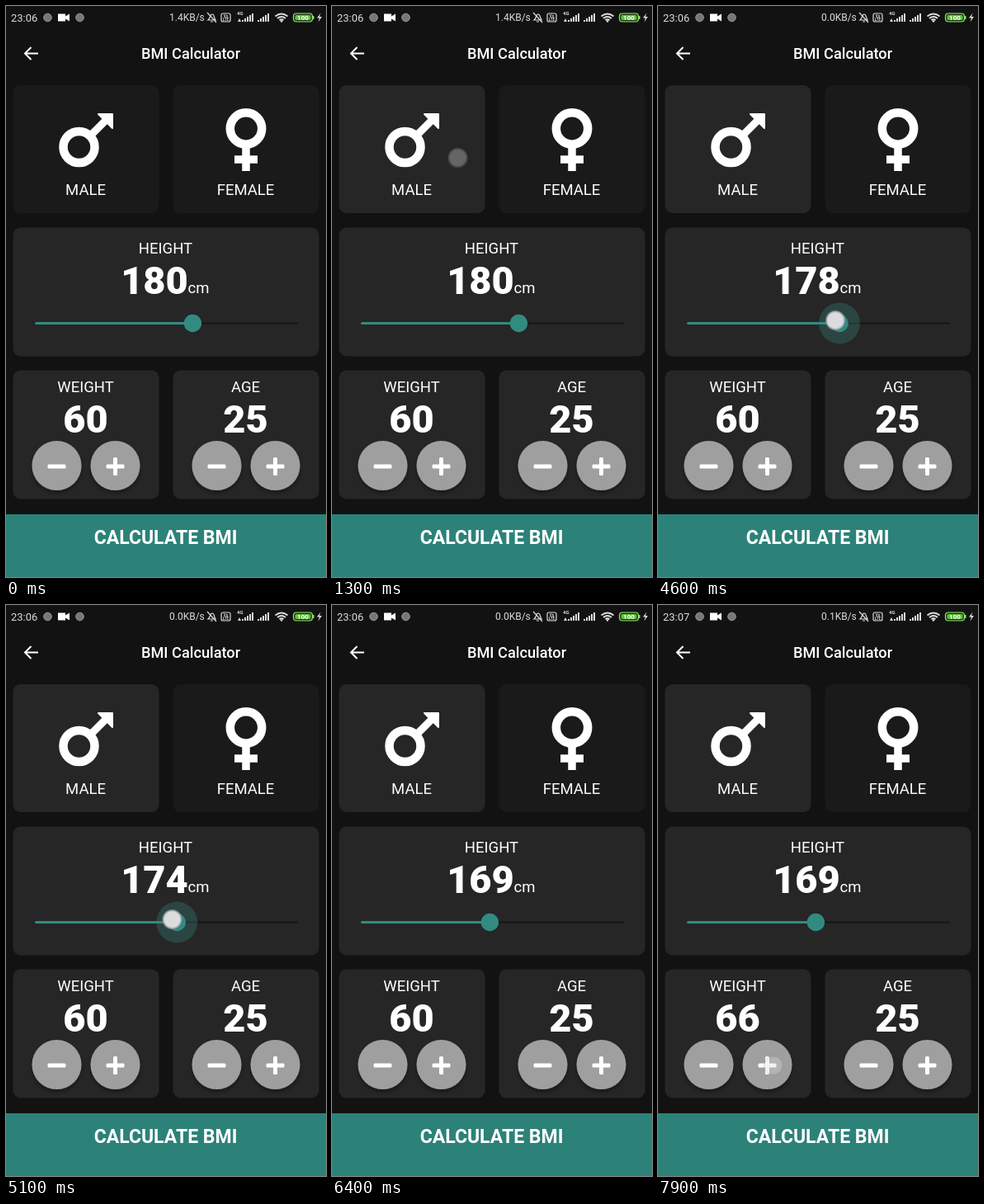
These frames come from a looping animation (388 px wide and 692 px high, 8000 ms). An HTML page:

```html
<!DOCTYPE html>
<html lang="en">
<head>
<meta charset="utf-8">
<title>BMI Calculator</title>
<style>
  html, body { margin: 0; width: 100%; height: 100%; overflow: hidden; background: #121212; }
  svg { display: block; width: 388px; height: 692px; font-family: Roboto, sans-serif; fill: #fff; }
  .card { fill: #262626; }
  .idle { fill: #1a1a1a; }
  .label { font-size: 18.5px; text-anchor: middle; }
  .num { font-size: 47px; font-weight: 900; text-anchor: middle; }
  .status { fill: #dcdcdc; }
  .line { fill: none; stroke: #dcdcdc; stroke-width: 1.2; }
  .icon { fill: none; stroke: #fff; }
</style>
</head>
<body>
<svg viewBox="0 0 388 692">
  <defs>
    <filter id="shadow" x="-20%" y="-20%" width="140%" height="150%">
      <feDropShadow dx="0" dy="3" stdDeviation="2.5" flood-color="#000" flood-opacity=".4"/>
    </filter>
    <radialGradient id="glow">
      <stop offset=".7" stop-color="#dcdcde"/>
      <stop offset=".85" stop-color="#b4b4ba" stop-opacity=".8"/>
      <stop offset="1" stop-color="#55506a" stop-opacity="0"/>
    </radialGradient>
    <g id="disc">
      <circle r="30" fill="#9f9f9f" filter="url(#shadow)"/>
      <rect x="-11" y="-1.6" width="22" height="5" rx="1.5"/>
    </g>
    <g id="plus">
      <use href="#disc"/>
      <rect x="-2.5" y="-10" width="5" height="22" rx="1.5"/>
    </g>
    <g id="bars">
      <path d="M0 10v-2h2v2zM3 10v-4h2v4zM6 10v-6h2v6zM9 10v-8h2v8zM12 10v-10h2v10z"/>
    </g>
  </defs>
  <rect width="388" height="692" fill="#121212"/>

  <g class="status">
    <text id="clock" x="6" y="18.5" font-size="13">23:06</text>
    <g fill="#777" stroke="#999">
      <circle cx="50.5" cy="14" r="4.8"/>
      <circle cx="89.5" cy="14" r="4.8"/>
    </g>
    <path fill="#fff" d="M63 9.5h9v3l5-3v9l-5-3v3h-9z"/>
    <text id="speed" x="198" y="18" font-size="12">1.4KB/s</text>
    <path class="line" d="M245 17h9c-2-2-1-7-4-7s-2 5-5 7zM248 19h3M244 8l11 12"/>
    <rect class="line" x="261" y="9" width="11" height="10" rx="2"/>
    <text x="266.5" y="13.8" font-size="4.5" font-weight="700" text-anchor="middle">Vo</text>
    <text x="266.5" y="18" font-size="4.5" font-weight="700" text-anchor="middle">LTE</text>
    <text x="280" y="11" font-size="6" font-weight="700">4G</text>
    <path d="M281 19l2-4 2 4z"/>
    <use href="#bars" x="286" y="9"/>
    <use href="#bars" x="305" y="9"/>
    <path class="line" stroke-width="1.8" d="M326.500 12.500q7.500-6 15 0M329 15q5-4 10 0M331.500 17.300q2.500-2 5 0" style="stroke-width:1.8"/>
    <circle cx="334" cy="18.500" r="1.3"/>
    <rect x="348.500" y="9" width="23" height="10" rx="3.500" fill="#1d3a14" stroke="#8fe36c" stroke-width="1.2"/>
    <rect x="350.500" y="11" width="19" height="6" rx="1.500" fill="#62bd40"/>
    <rect x="372" y="12" width="1.500" height="4" fill="#8fe36c"/>
    <text x="360" y="16.800" font-size="8" font-weight="700" text-anchor="middle" fill="#fff">100</text>
    <path d="M381.500 8.500l-4.500 6h3l-1.500 5 4.500-6.500h-3z"/>
  </g>

  <path class="icon" stroke-width="2" d="M39 57.500H23M30.500 50l-7.500 7.500 7.500 7.500"/>
  <text x="224" y="63.500" font-size="18.200" font-weight="500" text-anchor="middle">BMI Calculator</text>

  <rect id="male" class="idle" x="8.500" y="96" width="177" height="155" rx="9"/>
  <rect class="idle" x="202.500" y="96" width="177" height="155" rx="9"/>
  <rect class="card" x="8.500" y="268.500" width="371" height="156" rx="9"/>
  <rect class="card" x="8.500" y="441.500" width="177" height="156" rx="9"/>
  <rect class="card" x="202.500" y="441.500" width="177" height="156" rx="9"/>

  <g class="icon" stroke-width="10.500">
    <circle cx="88.500" cy="171" r="19"/>
    <path stroke-width="9" d="M103 156.500l18-18"/>
    <path fill="#fff" stroke-width="2" stroke-linejoin="round" d="M112 131h17v17z"/>
    <circle cx="291" cy="148.500" r="19.200"/>
    <path stroke-width="9.500" d="M291 170v30M277 186h28"/>
  </g>
  <text class="label" x="96.500" y="229.300">MALE</text>
  <text class="label" x="290.500" y="229.300">FEMALE</text>

  <text class="label" x="193.500" y="300">HEIGHT</text>
  <text id="height" class="num" x="180" y="348.500">180</text>
  <text x="220.500" y="348" font-size="18.500">cm</text>
  <rect x="35" y="383.300" width="319" height="2.400" rx="1" fill="#191919"/>
  <rect id="track" x="35" y="383" width="191" height="3" rx="1.500" fill="#328b80"/>
  <circle id="halo" cy="384.500" r="25" fill="#328b80"/>
  <circle id="thumb" cy="384.500" r="10.700" fill="#328b80"/>

  <text class="label" x="96.500" y="468.300">WEIGHT</text>
  <text id="weight" class="num" x="96.500" y="516.500">60</text>
  <text class="label" x="290.500" y="468.300">AGE</text>
  <text class="num" x="290.500" y="516.500">25</text>
  <use href="#disc" x="61.500" y="557"/>
  <use href="#plus" x="132.500" y="557"/>
  <use href="#disc" x="255.500" y="557"/>
  <use href="#plus" x="326.500" y="557"/>

  <rect y="616" width="388" height="76" fill="#2c8278"/>
  <text x="193.500" y="651.500" font-size="23" font-weight="700" text-anchor="middle">CALCULATE BMI</text>

  <circle id="touch" r="13" fill="url(#glow)"/>
</svg>
<script>
  const LOOP = 8000, LAG = 200, TRACK_X = 35, PX_PER_CM = 3.19, MIN_CM = 120;
  const DRAG = [[3900, 226], [4200, 226], [5100, 201.5], [5600, 191]];
  const PRESS = 3900, RELEASE = 5900;
  const MALE_TAP = 1170;
  const WEIGHT_TAPS = Array.from({ length: 6 }, (_, i) => 6620 + 230 * i);

  const $ = id => document.getElementById(id);
  const set = (id, attrs) => {
    for (const k in attrs) $(id).setAttribute(k, attrs[k]);
  };
  const write = (id, text) => {
    if ($(id).textContent !== text) $(id).textContent = text;
  };

  // Piecewise linear value of a [time, value] table, clamped at both ends
  function at(keys, t) {
    if (t <= keys[0][0]) return keys[0][1];
    for (let i = 1; i < keys.length; i++) {
      const [t0, a] = keys[i - 1], [t1, b] = keys[i];
      if (t < t1) return a + (b - a) * (t - t0) / (t1 - t0);
    }
    return keys[keys.length - 1][1];
  }

  const fade = (t, down, up) => at([[down, 0], [down + 80, 1], [up, 1], [up + 170, 0]], t);
  const tap = (t, up) => fade(t, up - 140, up + 20);

  function touchAt(t) {
    if (t < 3000) return [152.5, 184, tap(t, MALE_TAP)];
    if (t < 6300) return [at(DRAG, t), 381, fade(t, PRESS, RELEASE)];
    return [140, 558, Math.max(...WEIGHT_TAPS.map(up => tap(t, up)))];
  }

  function draw(t) {
    $('male').setAttribute('class', t < MALE_TAP ? 'idle' : 'card');
    write('clock', t < 7500 ? '23:06' : '23:07');
    write('speed', (t < 2600 ? '1.4' : t < 6900 ? '0.0' : '0.1') + 'KB/s');

    // The slider trails the finger and snaps to whole centimetres
    const cm = Math.round(MIN_CM + (at(DRAG, t - LAG) - TRACK_X) / PX_PER_CM);
    const x = TRACK_X + (cm - MIN_CM) * PX_PER_CM;
    const halo = fade(t, PRESS + 100, RELEASE + 50);
    write('height', String(cm));
    set('track', { width: x - TRACK_X });
    set('thumb', { cx: x });
    set('halo', { cx: x, r: 10 + 15 * halo, opacity: 0.3 * halo });

    write('weight', String(60 + WEIGHT_TAPS.filter(up => t >= up).length));

    const [cx, cy, opacity] = touchAt(t);
    set('touch', { cx, cy, opacity });
  }

  const start = performance.now();
  function tick() {
    draw((performance.now() - start) % LOOP);
    requestAnimationFrame(tick);
  }
  tick();
</script>
</body>
</html>
```
